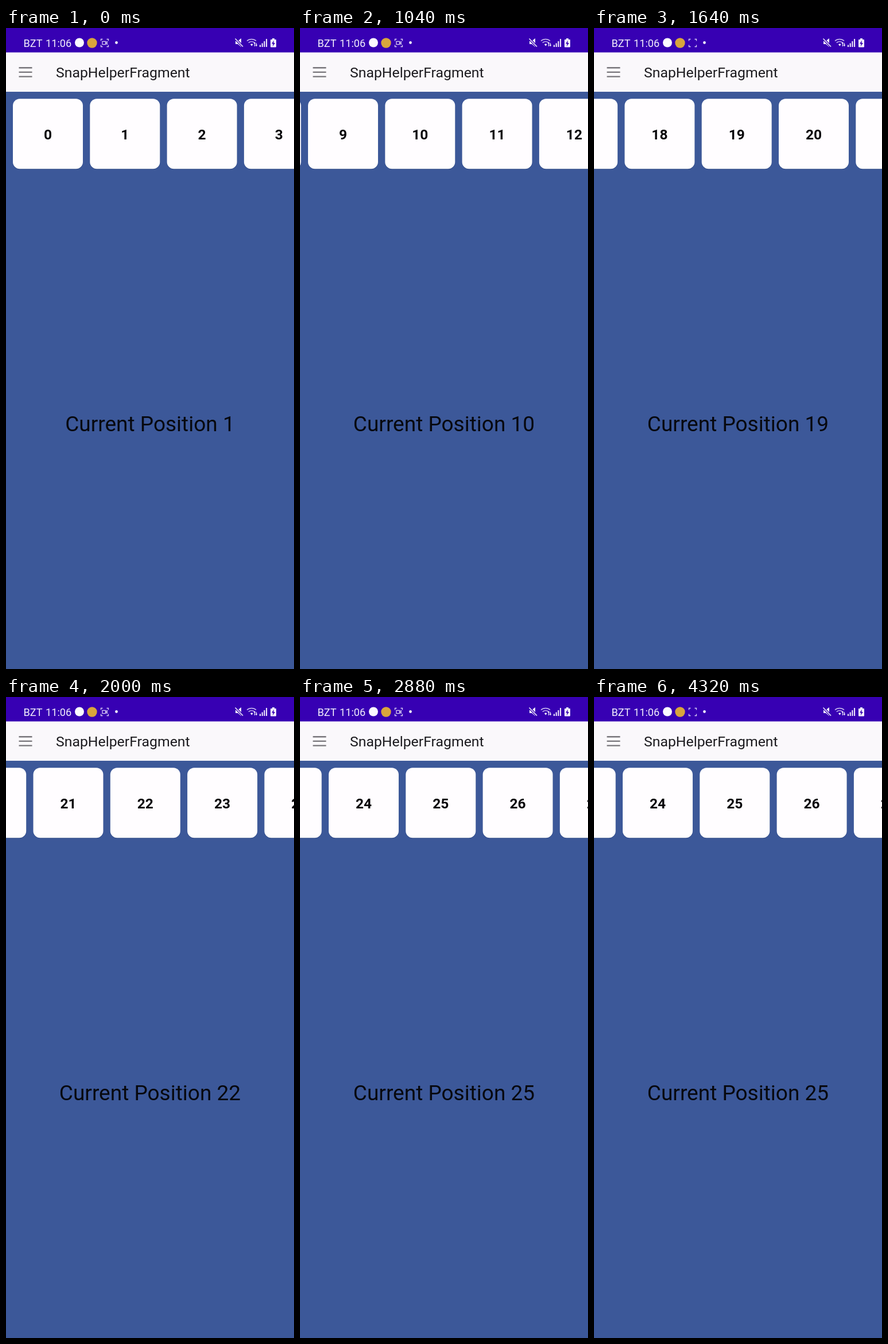
Write an HTML page that moves like this. It is 502 by 1116 pixels and loops after 4640 ms.

```html
<!DOCTYPE html>
<html lang="en">
<head>
<meta charset="utf-8">
<title>SnapHelperFragment</title>
<style>
  html, body { margin: 0; width: 100%; height: 100%; overflow: hidden; background: #3c5899; }
  svg { display: block; width: 100%; height: 100%; }
  text { font-family: Roboto, "Noto Sans", sans-serif; }
  .status { font-size: 18.2px; fill: #f3effc; }
  .title { font-size: 24.8px; fill: #1c1b1f; }
  .number { font-size: 24.5px; font-weight: 600; fill: #08070a; text-anchor: middle; }
  .position { font-size: 37px; fill: #07080e; text-anchor: middle; }
</style>
</head>
<body>
<svg viewBox="0 0 502 1116">
  <rect width="502" height="1116" fill="#3c5899"/>
  <g id="cards"></g>

  <rect y="42" width="502" height="69" fill="#faf8fb"/>
  <path d="M22.5 69.2h23M22.5 76.9h23M22.5 84.6h23" stroke="#77757a" stroke-width="2.4"/>
  <text class="title" x="87" y="86.3">SnapHelperFragment</text>

  <rect width="502" height="42.5" fill="#3700b3"/>
  <text class="status" x="30.5" y="33">BZT</text>
  <text class="status" x="69" y="33">11:06</text>
  <circle cx="128" cy="25.5" r="8" fill="#fbf9ff"/>
  <circle cx="150" cy="26" r="8.7" fill="#d9a53c"/>
  <g fill="none" stroke="#d9cdf4" stroke-width="1.3">
    <path d="M165.5 22.5v-3h3M175.5 19.5h3v3M178.500 29.500v3h-3M168.500 32.500h-3v-3"/>
    <path id="camera" d="M168 23.300h5.500v5.400h-5.500zM173.800 25.500l2.400-1.700v4.400l-2.400-1.700"/>
  </g>
  <circle cx="192.500" cy="25.500" r="2.400" fill="#f3effc"/>

  <g fill="#f5f1fd">
    <path d="M400 22.500h4l6-4.500v15l-6-5h-4z"/>
    <path d="M399.500 18.500l13.500 14" stroke="#3700b3" stroke-width="4"/>
    <path d="M399.500 18.500l13.500 14" stroke="#f5f1fd" stroke-width="1.500"/>
    <path d="M426 28.500a3 3 0 0 1 4.500 0l-2.250 3z"/>
    <path d="M432 26l2-2.600 2 2.600v0h-1.400v5h-1.200v-5zM435.200 28h1.200v-3h1v3h1.200l-1.700 3.500z" transform="translate(-.5 1)"/>
    <path d="M442 29.500h2v3.500h-2zM445.700 26.500h2v6.500h-2zM449.400 23h2v10h-2zM453.100 19h2v14h-2z"/>
    <path d="M464 18h4v2h2q1 0 1 1v11.500q0 1-1 1h-8q-1 0-1-1V21q0-1 1-1h2z"/>
  </g>
  <path d="M420 22.500a12 12 0 0 1 16 0M422.800 25.600a8 8 0 0 1 10.500 0" fill="none" stroke="#cfc0f1" stroke-width="1.400"/>
  <path d="M467 21.500l-4 6h2.600l-.7 4.500 4.100-6h-2.600z" fill="#3700b3"/>

  <text id="position" class="position" x="251" y="702"></text>
</svg>
<script>
const LOOP = 4640, STEP = 40;
const PITCH = 134.3, SIZE = 122, LEFT = 12, VISIBLE = 5;
const NS = 'http://www.w3.org/2000/svg';

// Swipe and fling: time (ms), scroll (px), speed (px/ms)
const KEYS = [
  [160, 0, 0], [560, 263.6, 1.6], [1040, 1206.7, 2.43],
  [1640, 2376, 1.39], [2360, 3042.4, 0.55], [2880, 3185.2, 0]
];

function add(parent, name, attrs) {
  const el = document.createElementNS(NS, name);
  for (const key in attrs) el.setAttribute(key, attrs[key]);
  return parent.appendChild(el);
}

function makeCard() {
  const group = add(document.getElementById('cards'), 'g', {});
  const box = { width: SIZE, height: SIZE, rx: 12 };
  add(group, 'rect', { ...box, y: 124.3, fill: '#263d74', opacity: 0.55 });
  add(group, 'rect', { ...box, y: 123.3, fill: '#fffdff' });
  const label = add(group, 'text', { class: 'number', x: SIZE / 2, y: 194.3 });
  return { group, label };
}

const cards = Array.from({ length: VISIBLE }, makeCard);
const position = document.getElementById('position');
const camera = document.getElementById('camera');

function scrollAt(t) {
  if (t <= KEYS[0][0]) return KEYS[0][1];
  const i = KEYS.findIndex(key => key[0] > t);
  if (i < 0) return KEYS[KEYS.length - 1][1];
  const [t0, s0, v0] = KEYS[i - 1], [t1, s1, v1] = KEYS[i];
  const d = t1 - t0, u = (t - t0) / d, w = 1 - u;
  return w * w * ((1 + 2 * u) * s0 + u * d * v0) +
         u * u * ((3 - 2 * u) * s1 - w * d * v1);
}

function draw(t) {
  const scroll = scrollAt(t);
  const first = Math.max(0, Math.floor((scroll - LEFT) / PITCH));
  cards.forEach(({ group, label }, i) => {
    const n = first + i;
    group.setAttribute('transform', `translate(${(LEFT + n * PITCH - scroll).toFixed(2)} 0)`);
    label.textContent = n;
  });
  const center = Math.round((251 - LEFT - SIZE / 2 + scroll) / PITCH);
  position.textContent = `Current Position ${center}`;
  const lit = Math.floor((t + 180) / 500) % 2 === 0;
  camera.setAttribute('visibility', lit ? 'visible' : 'hidden');
}

const start = performance.now();
function tick() {
  const t = (performance.now() - start) % LOOP;
  draw(Math.floor(t / STEP) * STEP);
  requestAnimationFrame(tick);
}
draw(0);
requestAnimationFrame(tick);
</script>
</body>
</html>
```
